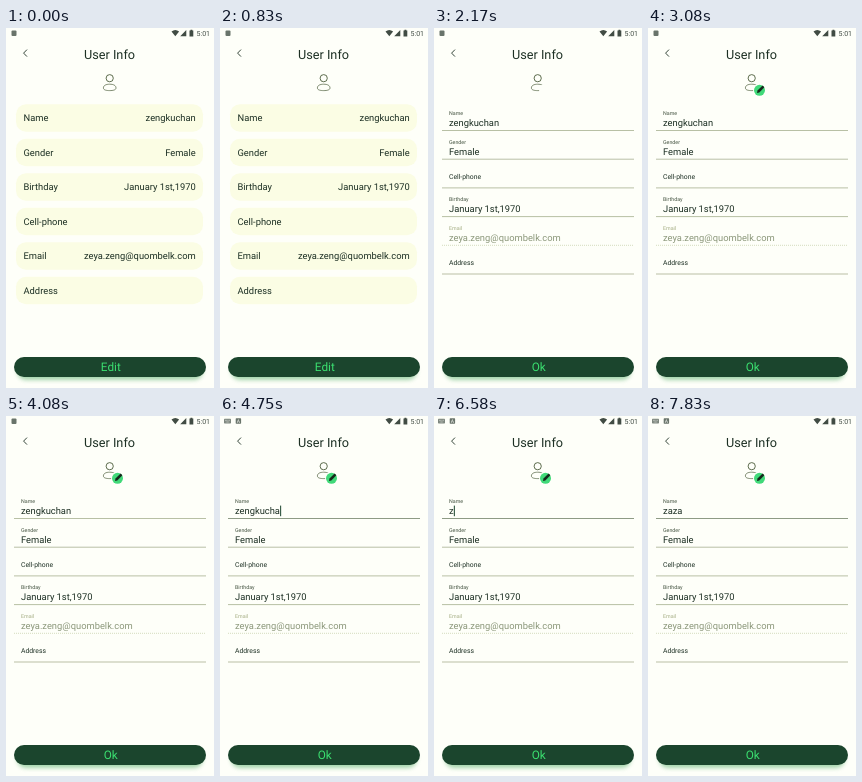
Animation of 208 by 360 pixels, one loop 8000 ms. Source, as an HTML page:

```html
<!DOCTYPE html>
<html lang="en">
<head>
<meta charset="utf-8">
<title>User Info</title>
<style>
html, body { margin: 0; width: 100%; height: 100%; overflow: hidden; background: #fefff9; }
svg { display: block; width: 100vw; height: 100vh; }
text { font-family: Roboto, Arial, sans-serif; text-rendering: geometricPrecision; white-space: pre; }
</style>
</head>
<body>
<svg id="stage" viewBox="0 0 208 360"></svg>
<script>
const LOOP = 8000, EDIT_AT = 2165, FOCUS_AT = 4290, CARET_OFF = 7570;
const INK = '#1d3024', GREEN = '#1b452d', LIME = '#3be070', PAGE = '#fefff9';
const FULL = 'zengkuchan', SHORT = 'zaza', MAIL = 'zeya.zeng@quombelk.com';
const DELETES = [4580, 4830, 5080, 5250, 5580, 5830, 6080, 6250, 6500];
const TYPES = [6750, 6910, 7080];

const stage = document.getElementById('stage');

function add(parent, tag, attrs, content) {
  const el = document.createElementNS('http://www.w3.org/2000/svg', tag);
  for (const key in attrs) el.setAttribute(key, attrs[key]);
  if (content !== undefined) el.textContent = content;
  parent.appendChild(el);
  return el;
}
const group = (parent = stage) => add(parent, 'g', {});
const label = (parent, x, y, size, content, fill = INK, anchor = 'start') =>
  add(parent, 'text', { x, y, 'font-size': size, fill, 'text-anchor': anchor }, content);
const show = (el, on) => el.setAttribute('visibility', on ? 'visible' : 'hidden');

const defs = add(stage, 'defs', {});
const blur = add(defs, 'filter', { id: 'soft', x: '-10%', y: '-60%', width: '120%', height: '220%' });
add(blur, 'feGaussianBlur', { stdDeviation: 2 });

add(stage, 'rect', { width: 208, height: 360, fill: PAGE });

// Status bar
const idleIcon = group(), inputIcons = group();
add(idleIcon, 'rect', { x: 5.5, y: 2.5, width: 5, height: 5.5, rx: 1, fill: '#69746b' });
add(inputIcons, 'rect', { x: 4, y: 2.8, width: 7, height: 4.6, rx: .7, fill: '#7d867e' });
add(inputIcons, 'path', { d: 'M5 4.3h5M5.8 6h3.4', stroke: PAGE, 'stroke-width': .6, 'stroke-dasharray': '.8 .5' });
add(inputIcons, 'rect', { x: 15.7, y: 2.3, width: 5.4, height: 5.4, rx: .6, fill: '#69746b' });
label(inputIcons, 18.4, 6.8, 5, 'A', PAGE, 'middle');
add(stage, 'path', { d: 'M165.5 3.6Q169.3 .6 173.1 3.6L169.3 8.2ZM180.3 2V8.2H174.2Z', fill: '#414c44' });
add(stage, 'path', { d: 'M183.5 2.6h1v-.8h1.8v.8h1v5.8h-3.8z', fill: '#414c44' });
label(stage, 204, 8, 7, '5:01', '#414c44', 'end');

// Header
add(stage, 'path', { d: 'M21 21.6L17.6 25.1L21 28.6', fill: 'none', stroke: INK, 'stroke-width': .9 });
label(stage, 103.5, 31.2, 12.7, 'User Info', INK, 'middle');
const line = { fill: 'none', stroke: '#4c5d3c', 'stroke-width': .9 };
add(stage, 'circle', { cx: 103.7, cy: 50.2, r: 3.6, ...line });
add(stage, 'path', { d: 'M97.4 60C97.4 57.4 100 56.2 103.7 56.2S110 57.4 110 60C110 62 107 62.6 103.7 62.6S97.4 62 97.4 60Z', ...line, 'stroke-width': .7 });

// Read-only cards
const view = group();
[['Name', FULL], ['Gender', 'Female'], ['Birthday', 'January 1st,1970'],
 ['Cell-phone', ''], ['Email', MAIL], ['Address', '']].forEach(([name, value], i) => {
  const y = 76.3 + i * 34.5;
  add(view, 'rect', { x: 10, y, width: 187, height: 27.5, rx: 10, fill: '#fbfde4' });
  label(view, 17.5, y + 17.1, 9.35, name);
  label(view, 189.7, y + 17.1, 9.35, value, INK, 'end');
});

// Editable fields
const form = group();
const fields = [['Name', FULL], ['Gender', 'Female'], ['Cell-phone', ''],
  ['Birthday', 'January 1st,1970'], ['Email', MAIL], ['Address', '']].map(([name, value], i) => {
  const y = 102.5 + i * 28.7, off = name === 'Email';
  const rule = add(form, 'path', { d: `M8 ${y}H200`, stroke: off ? '#c5cda6' : '#9ba582', 'stroke-width': .7 });
  if (off) rule.setAttribute('stroke-dasharray', '1 1');
  if (!value) label(form, 15, y - 9, 6.8, name);
  else label(form, 15, y - 15.6, 5.3, name, off ? '#a5ad83' : '#445340');
  return { rule, text: label(form, 15, y - 4.3, 9.35, value, off ? '#8c987b' : INK) };
});
const caret = add(form, 'rect', { y: 89.6, width: 1, height: 10.6, fill: GREEN });

// Avatar badge
add(form, 'circle', { cx: 111.5, cy: 62, r: 6.5, fill: PAGE });
const badge = group(form);
add(badge, 'circle', { cx: 111.5, cy: 62.3, r: 5.5, fill: '#41d979' });
add(badge, 'path', { d: 'M109 64.9L109.5 62.6L114.6 57.5L116.4 59.3L111.3 64.4Z', fill: '#15291c' });

// Button
add(stage, 'rect', { x: 11, y: 334, width: 186, height: 18, rx: 9, fill: '#73bd82', opacity: .65, filter: 'url(#soft)' });
add(stage, 'rect', { x: 8, y: 329, width: 192, height: 20, rx: 10, fill: GREEN });
const action = label(stage, 104.8, 343.2, 11.8, 'Edit', LIME, 'middle');

function nameAt(t) {
  const typed = TYPES.filter(k => t >= k).length;
  if (typed) return SHORT.slice(0, typed + 1);
  return FULL.slice(0, FULL.length - DELETES.filter(k => t >= k).length);
}

function render(t) {
  const editing = t >= EDIT_AT, focused = t >= FOCUS_AT;
  show(view, !editing);
  form.setAttribute('display', editing ? 'inline' : 'none');
  show(idleIcon, !focused);
  show(inputIcons, focused);
  action.textContent = editing ? 'Ok' : 'Edit';
  badge.setAttribute('opacity', Math.min(1, Math.max(0, (t - 2250) / 150)));

  const name = fields[0];
  name.text.textContent = nameAt(t);
  name.rule.setAttribute('stroke', focused ? '#5f7054' : '#9ba582');
  show(caret, focused && t < CARET_OFF);
  if (editing) caret.setAttribute('x', 15.2 + name.text.getComputedTextLength());
}

const start = performance.now();
function tick() {
  render((performance.now() - start) % LOOP);
  requestAnimationFrame(tick);
}
tick();
</script>
</body>
</html>
```
